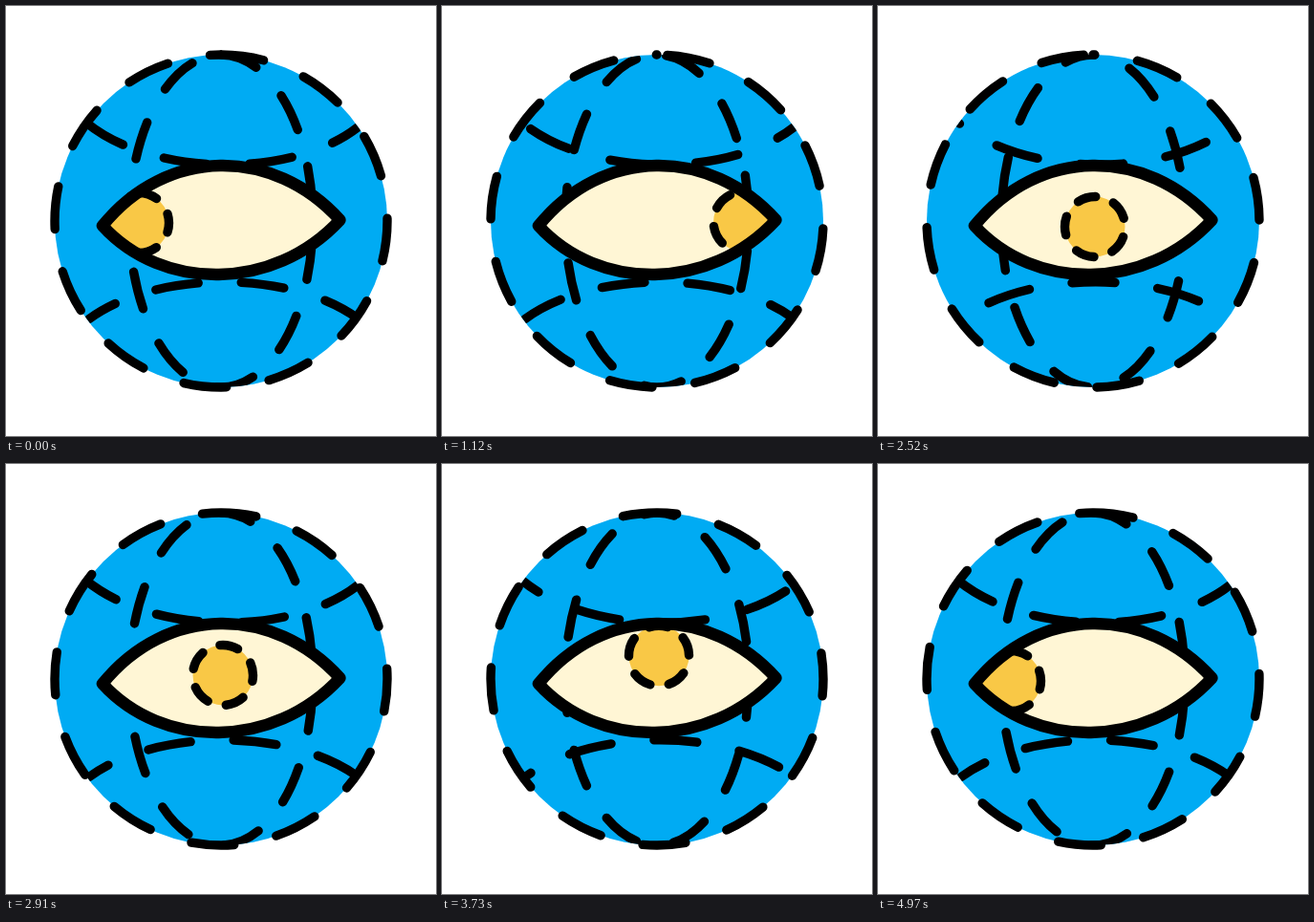
Animation, 450 px wide and 450 px high, one loop 5 s. Source, as an HTML page:

```html
<!DOCTYPE html>
<html lang="en">
<head>
<meta charset="utf-8">
<title>Globe with a watching eye</title>
<style>
  html, body { margin: 0; width: 100%; height: 100%; overflow: hidden; background: #fff; }
  svg { display: block; width: 100vw; height: 100vh; }
  .line { fill: none; stroke: #000; stroke-width: 9.4; stroke-linecap: round; stroke-linejoin: round; }
  .lid { stroke-width: 12.4; }
</style>
</head>
<body>
<svg viewBox="0 0 450 450">
  <defs>
    <clipPath id="disc"><circle cx="225" cy="225" r="174"/></clipPath>
    <clipPath id="opening"><path class="eye"/></clipPath>
  </defs>
  <circle cx="225" cy="225" r="174" fill="#00abf3"/>
  <g id="grid" clip-path="url(#disc)"></g>
  <g id="rim"></g>
  <path class="eye" fill="#fff6d5"/>
  <g clip-path="url(#opening)">
    <g id="pupil"><circle r="31.5" fill="#f9c846"/></g>
  </g>
  <path class="eye line lid"/>
</svg>
<script>
const LOOP = 5000;
const grid = document.getElementById('grid');
const rim = document.getElementById('rim');
const pupil = document.getElementById('pupil');
const eyePaths = document.querySelectorAll('.eye');

// Clockwise ellipse that starts at its top
const ellipse = (cx, cy, rx, ry) =>
  `M${cx} ${cy - ry}A${rx} ${ry} 0 0 1 ${cx} ${cy + ry}A${rx} ${ry} 0 0 1 ${cx} ${cy - ry}`;

const dashes = [];
function addDashed(parent, d, period, start = 0) {
  const path = document.createElementNS('http://www.w3.org/2000/svg', 'path');
  path.setAttribute('d', d);
  path.setAttribute('class', 'line');
  path.style.strokeDasharray = `${period / 2} ${period / 2}`;
  parent.append(path);
  dashes.push({ path, period, start });
}

addDashed(rim, ellipse(225, 225, 174, 174), 90.1);
addDashed(grid, ellipse(225, 225, 96, 174), 79.4);
addDashed(grid, 'M84 122C155 180 300 180 368 127', 90);
addDashed(grid, 'M87 327.5C157 276 298 276 368 327', 90, -13.4);
addDashed(pupil, ellipse(0, 0, 31.5, 31.5), 39.6);

// Smooth rise from 0 to 1 between two times
function rise(t, from, to) {
  const p = Math.min(1, Math.max(0, (t - from) / (to - from)));
  return p * p * (3 - 2 * p);
}

// Smooth swell from 0 to 1 and back around a time
const swell = (t, mid, reach) =>
  rise(t, mid - reach, mid) * rise(t, mid + reach, mid);

const lidOpen = t => 1 - 0.68 * (swell(t, 610, 310) + swell(t, 3270, 310));

const gazeX = t =>
  139 + 204 * rise(t, 100, 610) - 116 * rise(t, 900, 1600) - 88 * rise(t, 4100, 4850);

const gazeY = t =>
  227 - 4 * swell(t, 1670, 850) + 4 * swell(t, 2520, 850) - 54 * swell(t, 3400, 650);

function eyeShape(open) {
  const top = 227 - 80 * open;
  const bottom = 227 + 72 * open;
  return `M101 230C168 ${top} 280 ${top} 349.5 224C280 ${bottom} 164 ${bottom} 101 230Z`;
}

function draw(now) {
  const t = now % LOOP;
  for (const { path, period, start } of dashes) {
    path.style.strokeDashoffset = -(start + period * t / 1000);
  }
  const shape = eyeShape(lidOpen(t));
  eyePaths.forEach(p => p.setAttribute('d', shape));
  pupil.setAttribute('transform', `translate(${gazeX(t)} ${gazeY(t)})`);
}

const begin = performance.now();
function tick() {
  draw(performance.now() - begin);
  requestAnimationFrame(tick);
}
tick();
</script>
</body>
</html>
```
